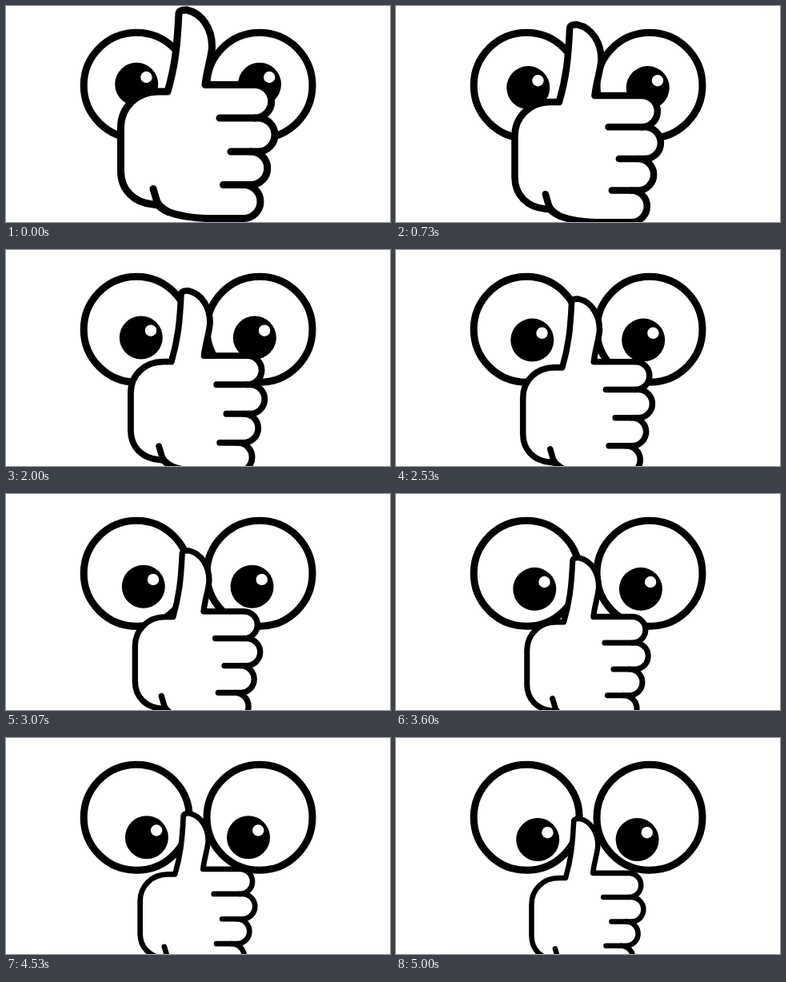
Recreate the animation shown at these times as an HTML page. Size 480 by 270 pixels, loop 5.07 s.

```html
<!DOCTYPE html>
<html lang="en">
<head>
<meta charset="utf-8">
<title>Thumbs up</title>
<style>
  html, body { margin: 0; width: 100%; height: 100%; overflow: hidden; background: #fff; }
  svg { display: block; width: 100vw; height: 100vh; }
  .line { fill: #fff; stroke: #000; stroke-width: 9; stroke-linecap: round; stroke-linejoin: round; }
  .open { fill: none; }
</style>
</head>
<body>
<svg viewBox="0 0 480 270">
  <circle class="line" cx="163.2" cy="99.3" r="66"/>
  <circle class="line" cx="317" cy="99.3" r="66"/>
  <g id="left"><circle r="27"/><circle cx="12.2" cy="-8.8" r="7.2" fill="#fff"/></g>
  <g id="right"><circle r="27"/><circle cx="12.2" cy="-8.8" r="7.2" fill="#fff"/></g>
  <g id="hand">
    <path class="line" d="M202 107 C211 76 214 52 216 9 Q217 4.5 226 5
      C246 9 258 30 257.5 52 C256 68 251 80 249 98.5
      H311 A20.75 20.75 0 0 1 311 140
      H315 A21 21 0 0 1 315 182
      H306 A20.75 20.75 0 0 1 306 223.5
      H297 A21 21 0 0 1 297 265.5
      H250 Q222 264.5 203 257.5 Q195 254 190 249 L184 248
      C160 246 143.5 230 143.5 206 V152 C143.5 126 164 107 190 107 Z"/>
    <path class="line open" d="M311 140 H267 M306 182 H281 M297 223.5 H271.5
      M184 228.5 L188 242 Q190 250 203 257.5"/>
  </g>
</svg>
<script>
  const LOOP = 5070, STEP = 1000 / 15;
  const VANISH = { x: 238.5, y: 356 };
  const [left, right, hand] = ['left', 'right', 'hand'].map(id => document.getElementById(id));
  const move = (el, x, y, scale = 1) =>
    el.setAttribute('transform', `translate(${x} ${y}) scale(${scale})`);

  function draw(ms) {
    const t = Math.floor((ms + 4) / STEP) * STEP / 1000;
    const p = t / 5;
    move(left, 163.2 + 14 * p, 97.8 + 29.2 * p);
    move(right, 317 - 15.4 * p, 97.8 + 29.2 * p);
    // The hand recedes from the viewer at constant speed
    const s = 1 / (1 + 0.0752 * t);
    move(hand, VANISH.x * (1 - s), VANISH.y * (1 - s), s);
  }

  const start = performance.now();
  function tick() {
    draw((performance.now() - start) % LOOP);
    requestAnimationFrame(tick);
  }
  tick();
</script>
</body>
</html>
```
